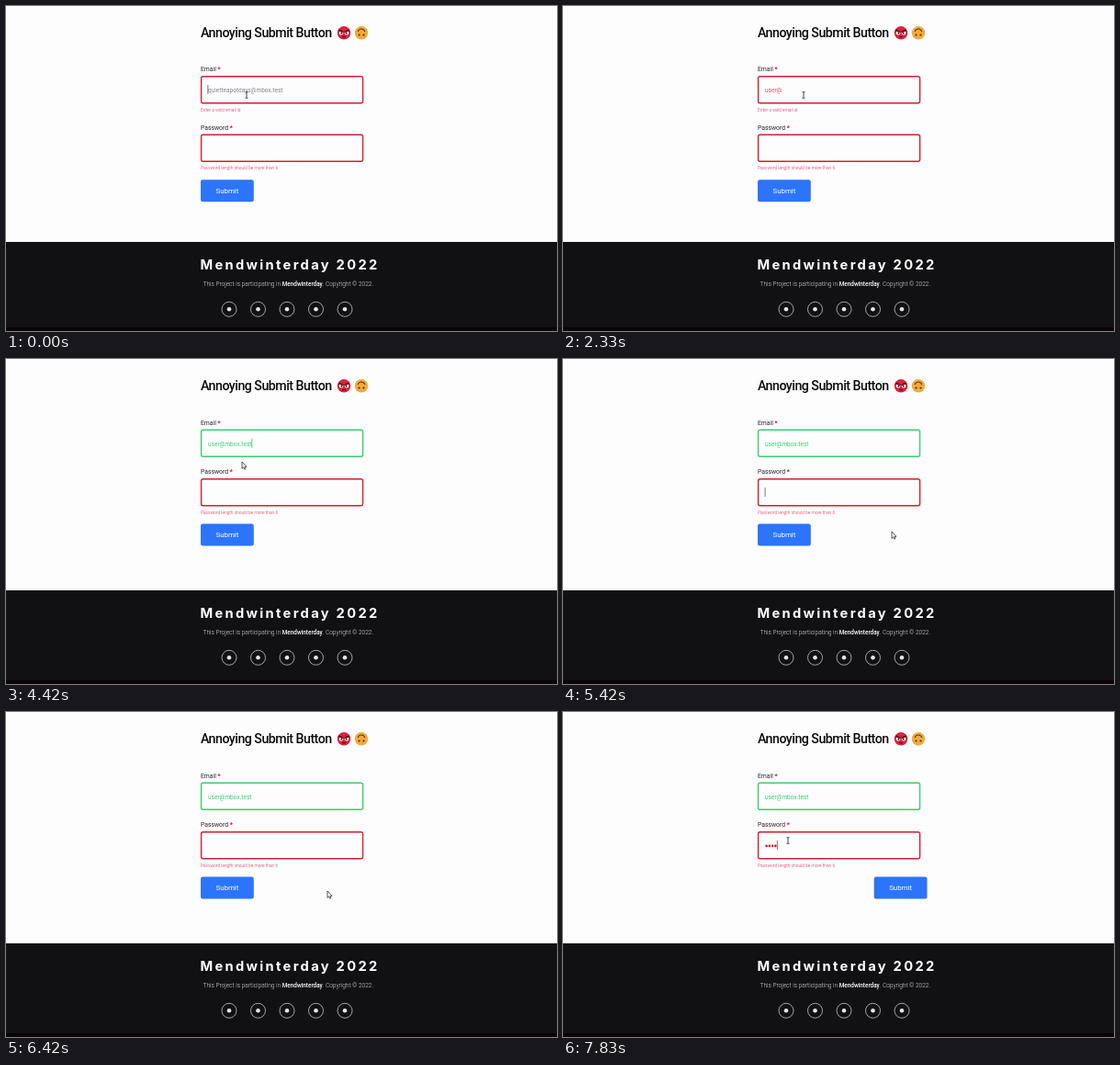
Recreate the animation shown at these times as an HTML page with a canvas. Size 600 by 354 pixels, loop 8 s.

```html
<!DOCTYPE html>
<html lang="en">
<head>
<meta charset="utf-8">
<title>Annoying Submit Button</title>
<style>
html, body { margin: 0; width: 100%; height: 100%; overflow: hidden; background: #fefdfe; }
canvas { display: block; width: 600px; height: 354px; }
</style>
</head>
<body>
<canvas id="stage" width="600" height="354"></canvas>
<script>
const ctx = document.getElementById('stage').getContext('2d');
const LOOP = 8000;
const RED = '#d01f31', GREEN = '#3ccb70', BLUE = '#2c74fb', INK = '#252528';
const BODY = 'Roboto, sans-serif', HEADING = 'Inter, sans-serif';

const EVENT = 'Mendwinterday';
const PLACEHOLDER = 'quietteapotdays@mbox.test';
const ADDRESS = 'user@mbox.test';

const addressKeys = [1170, 1420, 1590, 1670, 2330, 2500, 2580, 2670, 2830, 2920, 3000, 3170, 3250, 3330];
const passwordKeys = [7330, 7500, 7670, 7830];
const VALID_AT = 3250;

// The button dodges the pointer: right on the first time, back on the next.
const dodges = [5020, 5280, 5680, 5950, 6720];
const emailCaret = [[0, 580], [1170, 2000], [3330, 3800], [4300, 4700]];
const passwordCaret = [[4700, 4900], [5300, 5700], [7170, 8000]];

const pointerPath = [
  [3700, 262, 97], [4000, 258, 108], [4420, 257, 112], [4700, 246, 147],
  [4860, 246, 150], [5020, 243, 190], [5280, 350, 190], [5420, 358, 188],
  [5540, 350, 190], [5680, 248, 191], [5950, 346, 194], [6420, 350, 195],
  [6560, 340, 194], [6720, 252, 191], [6900, 247, 162], [7080, 245, 140]
];

const passed = (times, t) => times.filter(k => t >= k).length;
const within = (spans, t) => spans.some(([a, b]) => t >= a && t < b);

function pointerAt(t) {
  const next = pointerPath.findIndex(p => p[0] > t);
  if (next === 0) return pointerPath[0].slice(1);
  if (next < 0) return pointerPath[pointerPath.length - 1].slice(1);
  const [t0, x0, y0] = pointerPath[next - 1], [t1, x1, y1] = pointerPath[next];
  const u = (t - t0) / (t1 - t0), e = u * u * (3 - 2 * u);
  return [x0 + (x1 - x0) * e, y0 + (y1 - y0) * e];
}

// Draws text and returns the x where it ends.
function text(str, x, y, size, color, { weight = 400, family = BODY, spacing = 0, align = 'left' } = {}) {
  ctx.font = `${weight} ${size}px ${family}`;
  ctx.letterSpacing = spacing + 'px';
  ctx.textAlign = align;
  ctx.fillStyle = color;
  ctx.fillText(str, x, y);
  return x + ctx.measureText(str).width;
}

function box(x, y, w, h, r, fill, stroke) {
  ctx.beginPath();
  ctx.roundRect(x, y, w, h, r);
  if (fill) { ctx.fillStyle = fill; ctx.fill(); }
  if (stroke) { ctx.strokeStyle = stroke; ctx.lineWidth = 1.4; ctx.stroke(); }
}

function disc(x, y, r, fill) {
  ctx.beginPath();
  ctx.arc(x, y, r, 0, Math.PI * 2);
  ctx.fillStyle = fill;
  ctx.fill();
}

function line(points, color, width) {
  ctx.beginPath();
  points.forEach(([x, y]) => ctx.lineTo(x, y));
  ctx.strokeStyle = color;
  ctx.lineWidth = width;
  ctx.stroke();
}

function angryFace(x, y) {
  disc(x, y, 7.2, '#dc2238');
  for (const s of [-1, 1]) {
    disc(x + s * 3, y, 2.2, '#fff');
    disc(x + s * 2.6, y + 0.3, 1, '#1c0a10');
    line([[x + s * 0.7, y - 0.9], [x + s * 5.6, y - 3]], '#3a0a14', 1.5);
  }
  line([[x - 2, y + 4.4], [x + 2, y + 4.4]], '#4a0a16', 1);
}

function upsideDownFace(x, y) {
  disc(x, y, 7.2, '#f2aa3b');
  ctx.beginPath();
  ctx.arc(x, y - 0.2, 4, Math.PI * 1.1, Math.PI * 1.9);
  ctx.strokeStyle = '#4b3020';
  ctx.lineWidth = 1.1;
  ctx.stroke();
  disc(x - 2.5, y + 2.2, 1.1, '#4b3020');
  disc(x + 2.5, y + 2.2, 1.1, '#4b3020');
}

function label(str, y) {
  const end = text(str, 212, y, 6.8, INK);
  text('*', end + 1.4, y + 0.4, 7.5, '#d4102c', { weight: 700 });
}

function field(y, color) {
  box(212.6, y + 0.7, 176, 29, 2, '#fefdfe', color);
}

function caret(x, y, color) {
  ctx.fillStyle = color;
  ctx.fillRect(x, y, 0.8, 10);
}

function drawEmail(t, valid) {
  const y = valid ? 76.6 : 76;
  const typed = ADDRESS.slice(0, passed(addressKeys, t));
  const color = valid ? GREEN : '#d05460';
  label('Email', y - 5);
  field(y, valid ? GREEN : RED);
  let end = 219.5;
  if (typed) end = text(typed, 220, y + 17.9, 6.5, color);
  else text(PLACEHOLDER, 220, y + 17.9, 6.5, '#858388');
  if (within(emailCaret, t)) caret(end, y + 10, typed ? color : '#555');
  if (!valid) text('Enter a valid email id', 212, 114.7, 4.85, '#dd2448', { weight: 300 });
}

function drawPassword(t, y) {
  label('Password', y - 5);
  field(y, RED);
  const dots = passed(passwordKeys, t);
  for (let i = 0; i < dots; i++) disc(221.6 + i * 3.25, y + 15.9, 1.3, '#cc1529');
  if (within(passwordCaret, t)) {
    caret(219.7 + dots * 3.25 + (dots ? 0.2 : 0), y + 10, dots ? RED : '#555');
  }
  text('Password length should be more than 6', 212, y + 38.5, 4.85, '#dd2448', { weight: 300 });
}

function drawButton(t, y) {
  const right = passed(dodges, t) % 2 === 1;
  const x = right ? 338.7 : 212;
  box(x, y, 57.8, 24, 2.2, BLUE);
  text('Submit', x + 28.9, y + 14.9, 7.9, '#fff', { align: 'center' });
  if (right && t < passwordKeys[0]) {
    box(212, 214, 175, 20, 10, '#d0cfd1');
    text('You can not submit until you fix all the validation errors...', 222, 226.2, 6.2, '#333337');
  }
}

function drawFooter(y) {
  ctx.fillStyle = '#111113';
  ctx.fillRect(0, y, 600, 354 - y);
  ctx.fillStyle = '#0b0306';
  ctx.fillRect(0, 350, 600, 4);
  text(EVENT + ' 2022', 309, y + 30.2, 14.7, '#fff',
    { weight: 700, family: HEADING, spacing: 2.3, align: 'center' });
  let x = text('This Project is participating in ', 214.5, y + 48.3, 6.55, '#dedee0', { weight: 300 });
  x = text(EVENT, x, y + 48.3, 6.4, '#fff', { weight: 500 });
  text('. Copyright © 2022.', x, y + 48.3, 6.55, '#dedee0', { weight: 300 });
  for (let i = 0; i < 5; i++) {
    const cx = 243 + i * 31.5;
    ctx.beginPath();
    ctx.arc(cx, y + 73.3, 8, 0, Math.PI * 2);
    ctx.strokeStyle = '#c9c9cb';
    ctx.lineWidth = 0.8;
    ctx.stroke();
    disc(cx, y + 73.3, 2.3, '#e6e6e8');
  }
}

function drawArrow(x, y) {
  const shape = [[0, 0], [0, 7.4], [1.7, 5.9], [2.8, 8.2], [3.9, 7.7], [2.9, 5.5], [5, 5.3]];
  ctx.beginPath();
  shape.forEach(([dx, dy]) => ctx.lineTo(x + dx, y + dy));
  ctx.closePath();
  ctx.fillStyle = '#fff';
  ctx.fill();
  ctx.strokeStyle = '#2b2b30';
  ctx.lineWidth = 0.8;
  ctx.stroke();
}

function drawBeam(x, y) {
  line([[x, y - 3.2], [x, y + 3.2]], '#333', 0.9);
  for (const s of [-1, 1]) line([[x - 1.6, y + s * 3.3], [x + 1.6, y + s * 3.3]], '#333', 0.8);
}

function drawPointer(t, passwordY) {
  const [x, y] = pointerAt(t);
  const overField = top => x > 212 && x < 389 && y > top && y < top + 30;
  (overField(76) || overField(passwordY) ? drawBeam : drawArrow)(x, y);
}

function draw(t) {
  const valid = t >= VALID_AT;
  const passwordY = valid ? 130 : 139.6;
  ctx.fillStyle = '#fefdfe';
  ctx.fillRect(0, 0, 600, 354);
  text('Annoying Submit Button', 212, 34.2, 14.2, '#0b0b0d', { weight: 500, spacing: -0.5 });
  angryFace(368, 29.3);
  upsideDownFace(387, 29.3);
  drawEmail(t, valid);
  drawPassword(t, passwordY);
  drawFooter(valid ? 252 : 257);
  drawButton(t, valid ? 179.5 : 189.2);
  drawPointer(t, passwordY);
}

const start = performance.now();
function tick() {
  draw((performance.now() - start) % LOOP);
  requestAnimationFrame(tick);
}
tick();
</script>
</body>
</html>
```
